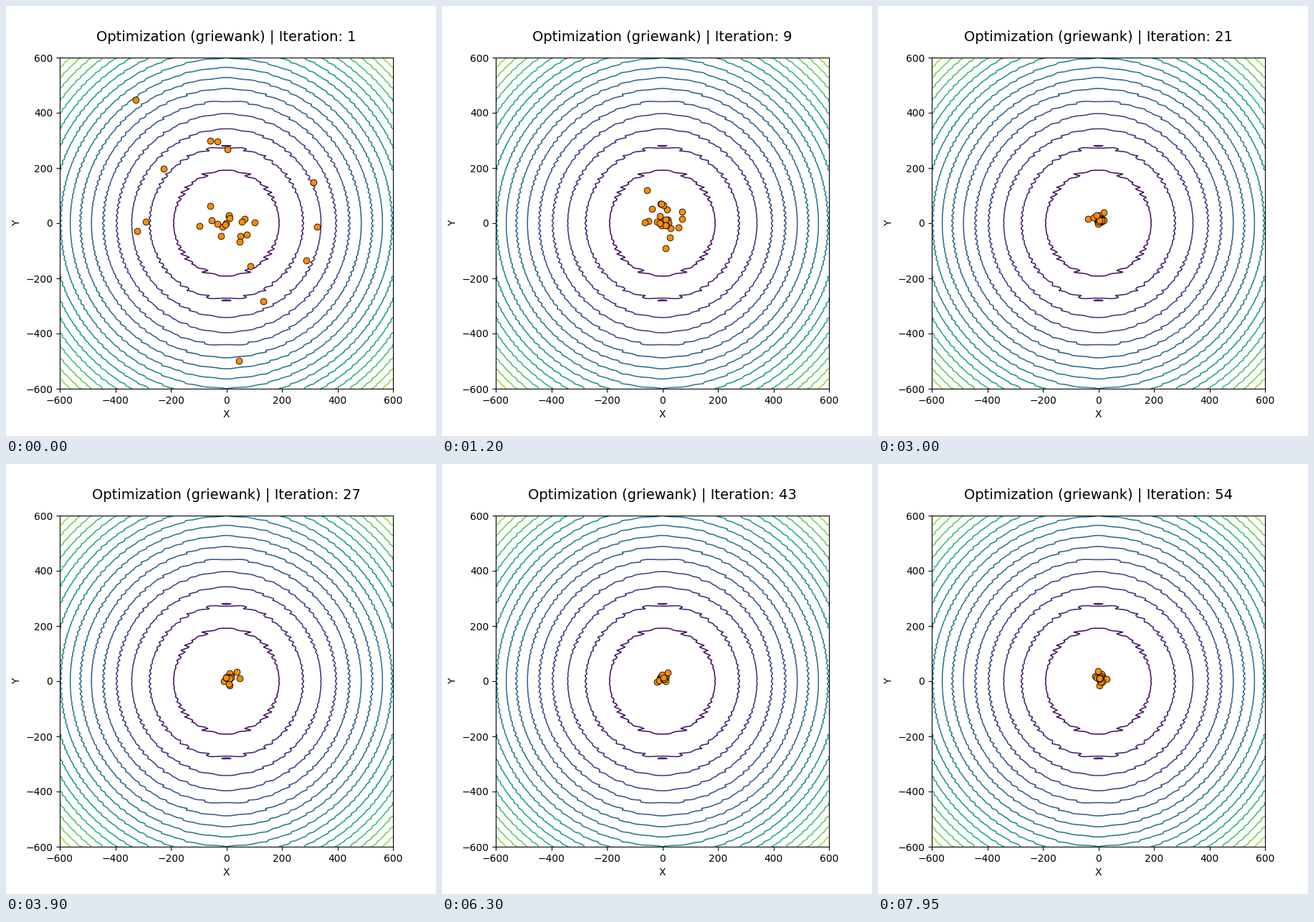
Write a matplotlib script that moves like this. It is 600x600 px and loops after 8000 ms.

```python
import matplotlib.pyplot as plt
import numpy as np
from matplotlib.animation import FuncAnimation

COUNT = 30            # particles in the swarm
TICK_MS = 50
TICKS_PER_STEP = 3    # one iteration lasts 150 ms
TICKS = 160
GOAL = np.array([4, 11])
SETTLE = 5            # iterations for the swarm to shrink by a factor of e
WANDER = 8            # mean search step once settled
OUTER = [(-326, 447), (-58, 299), (-226, 197), (-290, 5), (314, 148),
         (327, -13), (288, -135), (133, -283), (45, -499)]


def griewank(x, y):
    return 1 + (x**2 + y**2) / 4000 - np.cos(x) * np.cos(y / np.sqrt(2))


def cloud(seed, count, mean_radius):
    """Random points, dense in the middle with a few far out."""
    rng = np.random.default_rng(seed)
    radius = rng.exponential(mean_radius, count)
    angle = rng.uniform(0, 2 * np.pi, count)
    return np.column_stack([radius * np.cos(angle), radius * np.sin(angle)])


START = np.vstack([OUTER, cloud(7, COUNT - len(OUTER), 95)])


def positions(iteration):
    """Contract towards the goal while each particle keeps searching."""
    remaining = np.exp(-(iteration - 1) / SETTLE)
    search = GOAL + cloud(iteration, COUNT, WANDER)
    return remaining * START + (1 - remaining) * search


fig, ax = plt.subplots(figsize=(6, 6), dpi=100)
axis = np.linspace(-600, 600, 200)
X, Y = np.meshgrid(axis, axis)
ax.contour(X, Y, griewank(X, Y), levels=np.arange(0, 201, 10), cmap="viridis",
           linewidths=1.15)
ax.set(xlim=(-600, 600), ylim=(-600, 600), xlabel="X", ylabel="Y")
title = ax.text(0.5, 1.05, "", transform=ax.transAxes, ha="center", fontsize=14)
dots = ax.scatter(*START.T, s=40, c="darkorange", edgecolors="black",
                  linewidths=0.6, zorder=3)


def update(tick):
    iteration = tick // TICKS_PER_STEP + 1
    dots.set_offsets(positions(iteration))
    title.set_text(f"Optimization (griewank) | Iteration: {iteration}")
    return dots, title


animation = FuncAnimation(fig, update, frames=TICKS, interval=TICK_MS, repeat=True)
plt.show()
```
